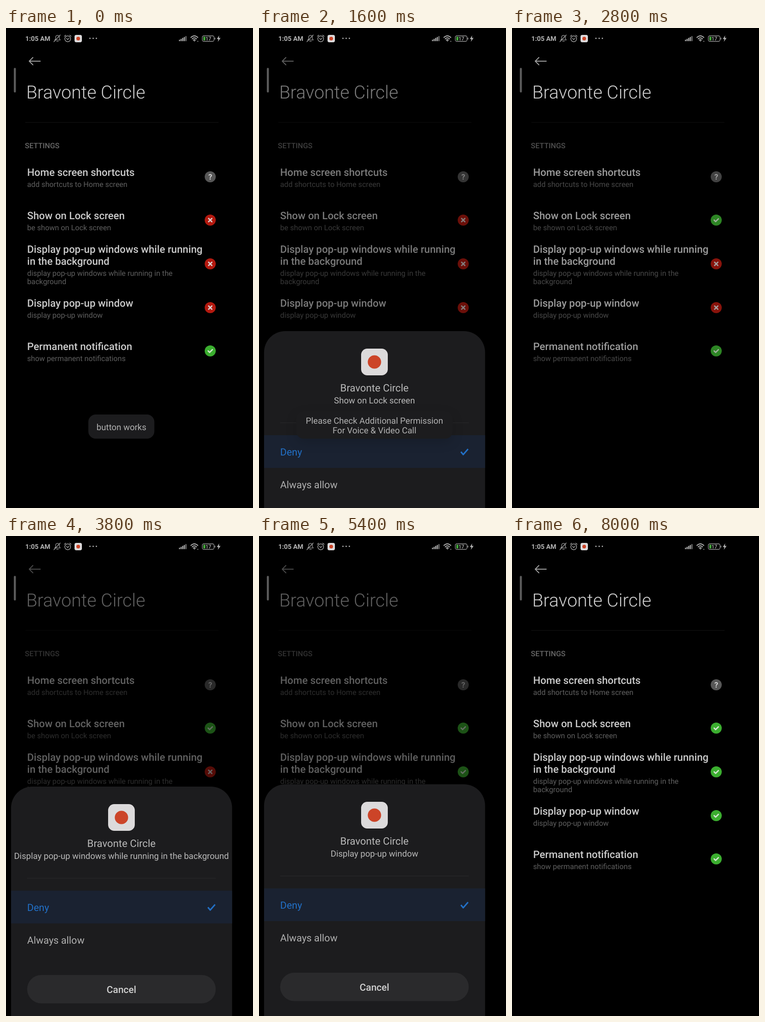
An HTML page with a canvas that plays this animation: 537 by 1042 pixels, repeating every 9400 ms.

```html
<!DOCTYPE html>
<html lang="en">
<head>
<meta charset="utf-8">
<title>Permission settings</title>
<style>
  html, body { margin: 0; width: 537px; height: 1042px; overflow: hidden; background: #000; }
  canvas { display: block; }
</style>
</head>
<body>
<canvas id="stage" width="537" height="1042"></canvas>
<script>
const ctx = document.getElementById('stage').getContext('2d');
const LOOP = 9400, STEP = 200, LAST = 8000;
const APP = 'Bravonte Circle';
const RED = '#b3190f', GREEN = '#3bae2f';
const SHEET_TOP = 537, SHEET_TRAVEL = 505;

const rows = [
  { title: ['Home screen shortcuts'], note: ['add shortcuts to Home screen'], y: 313, iconY: 323, kind: 'ask' },
  { title: ['Show on Lock screen'], note: ['be shown on Lock screen'], y: 407, iconY: 417, sheet: 0 },
  { title: ['Display pop-up windows while running', 'in the background'],
    note: ['display pop-up windows while running in the', 'background'], y: 480, iconY: 512, sheet: 1 },
  { title: ['Display pop-up window'], note: ['display pop-up window'], y: 597, iconY: 607, sheet: 2 },
  { title: ['Permanent notification'], note: ['show permanent notifications'], y: 691, iconY: 701, kind: 'yes' }
];
const sheets = [
  { open: 1500, close: 2500, text: 'Show on Lock screen' },
  { open: 3500, close: 4300, text: 'Display pop-up windows while running in the background' },
  { open: 5000, close: 6100, text: 'Display pop-up window' }
];

const clamp = v => Math.max(0, Math.min(1, v));

function text(str, x, y, size, color, weight = 400, align = 'left') {
  ctx.font = `${weight} ${size}px Roboto, sans-serif`;
  ctx.textRendering = 'geometricPrecision';
  ctx.textAlign = align;
  ctx.fillStyle = color;
  ctx.fillText(str, x, y);
}

function box(x, y, w, h, r, color) {
  ctx.fillStyle = color;
  ctx.beginPath();
  ctx.roundRect(x, y, w, h, r);
  ctx.fill();
}

function disc(x, y, r, color) {
  ctx.fillStyle = color;
  ctx.beginPath();
  ctx.arc(x, y, r, 0, Math.PI * 2);
  ctx.fill();
}

function stroke(path, color, width, cap = 'round') {
  ctx.strokeStyle = color;
  ctx.lineWidth = width;
  ctx.lineCap = cap;
  ctx.lineJoin = 'round';
  ctx.stroke(new Path2D(path));
}

function appIcon(x, y, size) {
  box(x, y, size, size, size * 0.23, '#dcdadb');
  disc(x + size / 2, y + size / 2, size * 0.25, '#cc4428');
}

function statusBar() {
  const c = '#b4b4b4';
  text('1:05 AM', 42, 28, 14.3, c, 700);
  // muted bell
  stroke('M106 26 L108 23 V20 Q108 16 112 16 Q116 16 116 20 V23 L118 26 Z M110 29 H114 M104 30 L118 15', c, 1.1);
  // alarm clock
  stroke('M140.5 23.5 A6.3 6.3 0 1 1 127.9 23.5 A6.3 6.3 0 1 1 140.5 23.5 M127 18 L130 15.5 M141.5 18 L138.5 15.5 M131.5 22.5 L134 25 L137 22.5', c, 1.3);
  appIcon(149, 15, 16);
  for (const x of [182.5, 189.5, 196.5]) disc(x, 22.5, 1.4, c);
  for (let i = 0; i < 5; i++) box(376 + i * 3.5, 25.5 - i * 2, 2.4, 3 + i * 2, 0.6, i < 4 ? c : '#777');
  stroke('M402 20.5 Q409.5 13.5 417 20.5 M404.8 23.5 Q409.5 19 414.2 23.5 M407.3 26.3 Q409.5 24.3 411.7 26.3', c, 1.9);
  disc(409.5, 28, 1.2, c);
  disc(417, 29, 1.2, '#777');
  ctx.strokeStyle = '#999';
  ctx.lineWidth = 1.3;
  ctx.beginPath();
  ctx.roundRect(426.7, 17, 25.6, 12, 3.5);
  ctx.stroke();
  box(429, 19, 4.5, 8, 1, '#45a83c');
  text('17', 440, 27, 11, c, 500, 'center');
  box(453.5, 21, 1.6, 4, 0.8, '#999');
  ctx.fillStyle = c;
  ctx.fill(new Path2D('M463.5 16 L458.5 24 H461.8 L460.5 30 L466.5 21.5 H462.8 Z'));
}

function statusIcon(kind, y) {
  const x = 444;
  disc(x, y, 12, { ask: '#575757', no: RED, yes: GREEN }[kind]);
  if (kind === 'ask') text('?', x, y + 6, 16.5, '#d2d2d2', 700, 'center');
  if (kind === 'no') stroke(`M${x - 3.5} ${y - 3.5} l7 7 m0 -7 l-7 7`, '#d8cfcf', 2.8);
  if (kind === 'yes') stroke(`M${x - 4.5} ${y} l3.2 3.2 l6 -6`, '#d3e4d0', 2.8);
}

function page(t) {
  stroke('M74.5 72 H51 M58.5 64 L50.5 72 L58.5 80', '#a0a0a0', 1.9);
  text(APP, 44, 152.5, 39.3, '#cfcfcf', 300);
  box(42, 204.5, 420, 1, 0, '#171717');
  text('SETTINGS', 41, 260.5, 16.1, '#686868', 500);
  for (const row of rows) {
    row.title.forEach((s, i) => text(s, 46, row.y + 8 + i * 26, 22.3, '#cbcbcb', 500));
    const noteY = row.y + 31.5 + (row.title.length - 1) * 26;
    row.note.forEach((s, i) => text(s, 46, noteY + i * 18.5, 16.2, '#5f5f5f'));
    const kind = row.kind || (t >= sheets[row.sheet].close + 300 ? 'yes' : 'no');
    statusIcon(kind, row.iconY);
  }
}

// The header brightens sooner than the list once a sheet closes.
function dimming(t) {
  let head = 0, list = 0;
  for (const { open, close } of sheets) {
    if (t <= open) continue;
    const rise = 1 - Math.exp(-(t - open) / 70);
    const since = t - close;
    head = Math.max(head, 0.54 * rise * Math.exp(-Math.max(0, since) / 50));
    list = Math.max(list, 0.53 * rise * Math.exp(-Math.max(0, since - 100) / 250));
  }
  return { head, list };
}

function shade(alpha, y, h) {
  if (alpha < 0.01) return;
  ctx.fillStyle = `rgba(0,0,0,${alpha})`;
  ctx.fillRect(0, y, 537, h);
}

function drawSheet(sheet, t) {
  const leaving = clamp((t - sheet.close) / 200);
  if (t <= sheet.open || leaving === 1) return;
  const arriving = Math.exp(-(t - sheet.open) / 70);
  const left = 1 - Math.pow(1 - leaving, 1.615);
  const top = Math.round(SHEET_TOP + SHEET_TRAVEL * Math.max(arriving, left));
  ctx.save();
  ctx.translate(0, top);
  box(11, 0, 480.5, 560, [46, 46, 0, 0], '#1c1c1e');
  appIcon(222, 38, 58);
  text(APP, 251, 131, 22.2, '#b9b9b9', 400, 'center');
  text(sheet.text, 251, 157, 18.6, '#b9b9b9', 400, 'center');
  box(46, 198.5, 410, 1, 0, '#2b2b2d');
  box(11, 226, 480.5, 71, 0, '#1a2231');
  text('Deny', 46, 270, 21.6, '#2270c6');
  stroke('M439 262 l5 6 l10.5 -12', '#2270c6', 3.2, 'butt');
  text('Always allow', 46, 341, 21.6, '#b0b0b0');
  box(46, 409, 410, 61.5, 30.7, '#2a2a2c');
  text('Cancel', 251, 448, 21, '#d0d0d0', 500, 'center');
  ctx.restore();
  // The sheet fades as it leaves; the area under it is black.
  if (leaving > 0) {
    ctx.fillStyle = `rgba(0,0,0,${0.8 * leaving})`;
    ctx.beginPath();
    ctx.roundRect(10, top - 1, 482.5, 560, [46, 46, 0, 0]);
    ctx.fill();
  }
}

function toast(lines, alpha, x, y, w) {
  if (alpha <= 0) return;
  ctx.save();
  ctx.globalAlpha = alpha;
  ctx.shadowColor = 'rgba(0,0,0,0.15)';
  ctx.shadowBlur = 24;
  ctx.shadowOffsetY = 8;
  box(x, y, w, 891.5 - y, 16, '#1c1c1e');
  ctx.shadowColor = 'transparent';
  const first = lines.length > 1 ? 858.5 : 872.5;
  lines.forEach((s, i) => text(s, 251, first + i * 21.8, 18.65, '#b2b2b2', 400, 'center'));
  ctx.restore();
}

function draw(t) {
  ctx.fillStyle = '#000';
  ctx.fillRect(0, 0, 537, 1042);
  page(t);
  const dim = dimming(t);
  shade(dim.head, 45, 145);
  shade(dim.list, 190, 852);
  statusBar();
  box(17, 86.5, 4.5, 53.5, 2.2, '#5a5a5a');
  for (const sheet of sheets) drawSheet(sheet, t);
  toast(['button works'], clamp((700 - t) / 200), 179, 839, 143.5);
  toast(['Please Check Additional Permission', 'For Voice & Video Call'],
    clamp((t - 700) / 200) * clamp((2700 - t) / 200), 81, 832, 340);
}

const start = performance.now();
function tick() {
  const t = (performance.now() - start) % LOOP;
  draw(Math.min(LAST, Math.floor(t / STEP) * STEP));
  requestAnimationFrame(tick);
}
tick();
</script>
</body>
</html>
```
